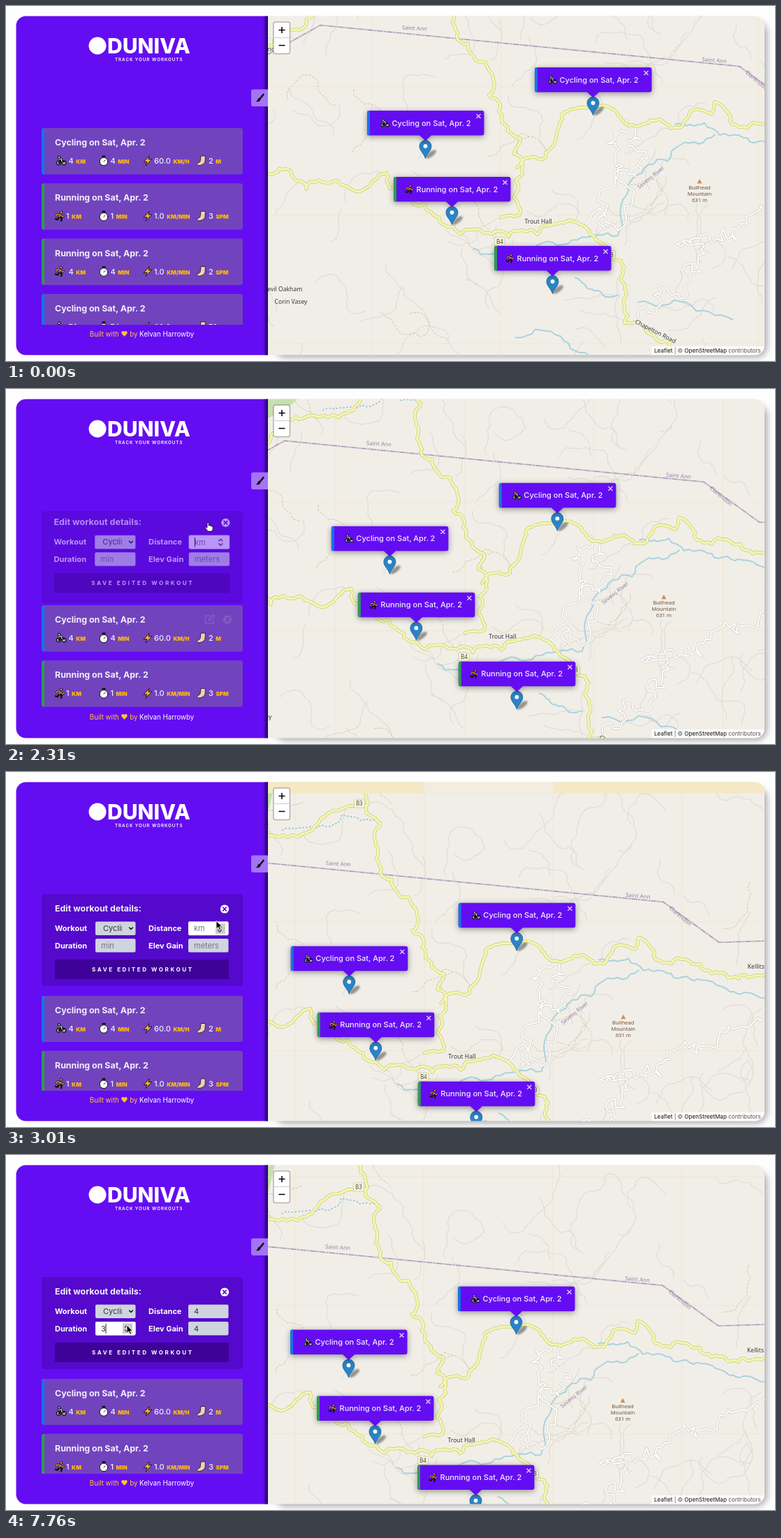
An HTML page that plays this animation: 1101 by 509 pixels, repeating every 8 s.

```html
<!DOCTYPE html>
<html lang="en">
<head>
<meta charset="utf-8">
<title>Workout tracker</title>
<style>
html, body { margin: 0; width: 100%; height: 100%; overflow: hidden; background: #fefefe; }
svg { font-family: Inter, "Open Sans", sans-serif; }
#stage { display: block; }
.line { fill: none; stroke-linejoin: round; stroke-linecap: round; }
.place, .area, .peak, .sign { font: 8px "Noto Sans", sans-serif; text-anchor: middle; }
.place { font-size: 8.6px; fill: #333; stroke: #f5f3ee; stroke-width: 1.5px; paint-order: stroke; }
.area { fill: #9482a3; }
.peak { fill: #6f5138; font-size: 7.6px; }
.sign { fill: #444; }
.title { font-size: 12.4px; font-weight: 700; fill: #f2eff9; }
.value { font-size: 11px; font-weight: 500; fill: #f2eff9; }
.unit { font-size: 8px; font-weight: 900; fill: #ffb90f; }
.label { font-size: 11px; font-weight: 700; fill: #fff; }
.entry { font-size: 11px; fill: #333; }
.hint { font-size: 11px; fill: #757780; }
.popup { filter: drop-shadow(0 2px 4px rgba(0,0,0,.4)); }
</style>
</head>
<body>
<svg id="stage" width="1101" height="509" viewBox="0 0 1101 509">
  <defs>
    <clipPath id="mapClip"><path d="M375 14.5H1072a14 14 0 0 1 14 14V486.500a14 14 0 0 1-14 14H375z"/></clipPath>
    <clipPath id="listClip"><rect x="50" y="175" width="290" height="282"/></clipPath>
    <filter id="soft" x="-20%" y="-20%" width="140%" height="140%"><feGaussianBlur stdDeviation="5"/></filter>
    <filter id="blur" x="-50%" y="-50%" width="200%" height="200%"><feGaussianBlur stdDeviation="1.3"/></filter>
    <linearGradient id="edge"><stop offset="0" stop-color="#10003a" stop-opacity="0"/><stop offset="1" stop-color="#10003a" stop-opacity=".85"/></linearGradient>
    <g id="bike" class="line" stroke="#111" stroke-width="1.2">
      <circle cx="-3.8" cy="3" r="2.9" fill="#aaa"/><circle cx="4" cy="3" r="2.9" fill="#aaa"/>
      <path d="M-3 3 0-1 4 1M-4-2 0-3 1 2" stroke-width="2.6"/><path d="M-4-2 0-3 1 1" stroke="#ddd"/>
      <circle cx="-3" cy="-5" r="1.7" fill="#eee"/>
    </g>
    <g id="run" class="line">
      <path d="M1-2-1 1 3 3 2 6.500M-1 1-3 5-6 4M1-2-4-3-5 0M1-2 4 1 6-1" stroke="#111" stroke-width="2.4"/>
      <path d="M1-2-4-3-5 0M1-2 4 1 6-1M1-2-1 1" stroke="#f39a35" stroke-width="1.2"/>
      <circle cx="2" cy="-5.5" r="1.8" fill="#f2a03c" stroke="#111" stroke-width=".9"/>
    </g>
    <g id="watch" class="line" stroke="#111">
      <path d="M-1.500-6.500H1.500" stroke-width="2.4"/><circle cy="1" r="5.8" style="fill:#fff"/><path d="M0 1 2-1"/>
    </g>
    <path id="bolt" d="M2-7-6 2-1 1.500-3 7 6-2.500 1-2z" fill="#ffb02c" stroke="#1b1230" stroke-linejoin="round"/>
    <path id="foot" d="M-1-7H5.500L5 1Q4 5-2 6.500-7 7-6.500 4.500L-2 1z" fill="#efcfb6" stroke="#2a1a22" stroke-width=".9"/>
    <g id="pin">
      <ellipse cx="8" cy="-6" rx="9" ry="3.6" transform="rotate(-38 8 -6)" opacity=".38" filter="url(#blur)"/>
      <path d="M0 0C-2-7-8.500-11-8.500-17.500A8.500 8.500 0 0 1 8.500-17.500C8.500-11 2-7 0 0z" fill="#2b83c6" stroke="#226ba6"/>
      <circle cy="-17.5" r="2.9" fill="#fff"/>
    </g>
    <g id="badge"><circle r="6.6"/><path d="M-2.300-2.300 2.300 2.300M2.300-2.300-2.300 2.300" stroke-width="1.7" stroke-linecap="round"/></g>
  </defs>

  <rect x="384" y="22" width="706" height="482" rx="16" fill="#777" opacity=".6" filter="url(#soft)"/>
  <g clip-path="url(#mapClip)">
    <rect x="375" y="14" width="711" height="487" fill="#f1eee8"/>
    <g id="map"></g>
  </g>
  <rect x="383" y="23" width="23.5" height="45.5" rx="3" fill="#fff" stroke="#000" stroke-opacity=".28" stroke-width="1.5"/>
  <path d="M384 45.500H406" stroke="#ccc"/>
  <path d="M390.500 34.500H399.500M395 30V39M390.500 56.500H399.500" stroke="#000" stroke-width="1.5"/>
  <path d="M924 488H1086A14 14 0 0 1 1072 500.500H924z" fill="#fff" fill-opacity=".75"/>
  <text x="928" y="497" font-size="8.15" fill="#555"><tspan fill="#111">Leaflet</tspan> | © <tspan fill="#111">OpenStreetMap</tspan> contributors</text>

  <path d="M375 14.500H28.500a14 14 0 0 0-14 14V486.500a14 14 0 0 0 14 14H375z" fill="#640df2"/>
  <rect x="368" y="14.5" width="7" height="486" fill="url(#edge)"/>
  <path d="M375 119.500H354a3 3 0 0 0-3 3V141a3 3 0 0 0 3 3H375z" fill="#a473f7"/>
  <path d="M368.500 127 363.500 133" class="line" stroke="#111" stroke-width="2.6"/>
  <path d="M361.500 131.500 364.500 134.500Q363 138 358 137 360.500 135 361.500 131.500z" fill="#111"/>
  <circle cx="131" cy="57" r="12.5" fill="#fff"/>
  <text x="145" y="68" font-size="30" font-weight="800" fill="#fff">DUNIVA</text>
  <text x="156" y="79" font-size="6.2" font-weight="600" letter-spacing="1" fill="#fff">TRACK YOUR WORKOUTS</text>
  <text x="194.5" y="473.5" font-size="9.7" text-anchor="middle" fill="#fff"><tspan fill="#ffc62b">Built with ♥ by</tspan> Kelvan Harrowby</text>

  <g clip-path="url(#listClip)">
    <g id="form"></g>
    <g id="cards"></g>
  </g>
  <g id="cursor">
    <path id="arrow" d="M0 0V11.500L2.700 9 4.700 13.300 6.700 12.400 4.800 8.300 8.300 8.200z" fill="#000" stroke="#fff" stroke-width=".9"/>
    <path id="hand" d="M-1 1Q0-1 1.200 1V5Q3 4 3.700 5.300 5.300 4.700 5.800 6.200 7.400 6 7.300 8 7.300 10.500 5.800 13H-.3Q-1.500 10.500-3.500 8.500-4.300 6.800-2.800 6.900L-1 8z" fill="#fff" stroke="#111" stroke-width=".9"/>
  </g>
</svg>

<script>
const LOOP = 8000, BLINK = 530;
const $ = id => document.getElementById(id);
const add = (parent, markup) => {
  parent.insertAdjacentHTML('beforeend', markup);
  return parent.lastElementChild;
};

// Steps are [time, properties, easing]; the ends are held.
function play(el, steps) {
  const all = [[0, steps[0][1]], ...steps, [LOOP, steps[steps.length - 1][1]]];
  el.animate(all.map(([t, props, easing = 'linear']) => ({ ...props, offset: t / LOOP, easing })),
    { duration: LOOP, iterations: Infinity });
}
// Hidden at first, then on and off at the given times.
const toggle = (el, ...times) => play(el, [[0, { opacity: 0 }, 'step-end'],
  ...times.map((t, i) => [t, { opacity: i % 2 ? 0 : 1 }, 'step-end'])]);
const move = (x, y) => ({ transform: `translate(${x}px, ${y}px)` });

let seed = 41;
const rnd = () => (seed = seed * 16807 % 2147483647) / 2147483647;
const toPath = points => 'M' + points.map(p => p.map(v => v.toFixed(1)).join(' ')).join('L');

// A winding line: every part is bent at its middle until it is short.
function winding(keys, amp) {
  let list = keys.split(' ').map(p => p.split(',').map(Number));
  for (let pass = 0; pass < 4; pass++) {
    list = list.flatMap(([x, y], i) => {
      if (!i) return [[x, y]];
      const [px, py] = list[i - 1], k = (rnd() - .5) * amp;
      if (Math.hypot(x - px, y - py) < 8) return [[x, y]];
      return [[(x + px) / 2 - (y - py) * k, (y + py) / 2 + (x - px) * k], [x, y]];
    });
  }
  return toPath(list);
}
const stroke = (d, color, width, more = '') =>
  `<path class="line" d="${d}" stroke="${color}" stroke-width="${width}" ${more}/>`;
const lines = (keys, amp) => keys.map(k => winding(k, amp)).join('');
const road = (d, casing, fill, width) => `<g>${stroke(d, casing, width)}${stroke(d, fill, width * .64)}</g>`;

// Random wandering paths over the whole map.
function wander(count, turn) {
  return Array.from({ length: count }, () => {
    let x = 265 + rnd() * 820, y = 15 + rnd() * 585, a = rnd() * 6.3;
    return toPath(Array.from({ length: 7 + rnd() * 12 }, () => {
      a += (rnd() - .5) * turn;
      return [x += 9 * Math.cos(a), y += 9 * Math.sin(a)];
    }));
  }).join('');
}

const TILE = 184.6, TILE_X = 413.5, TILE_Y = 31;
const grid = () => [-1, 0, 1, 2, 3].map(k =>
  `M${TILE_X + TILE * k} 0V620M250 ${TILE_Y + TILE * k}H1100`).join('');

const text = (cls, x, y, words, more = '') => `<text class="${cls}" x="${x}" y="${y}" ${more}>${words}</text>`;
const label = (cls, x, y, words, turn = 0) =>
  text(cls, 0, 3, words, `transform="translate(${x} ${y}) rotate(${turn})"`);
const sign = (x, y, name) => `<rect x="${x - 7.5}" y="${y - 6}" width="15" height="12" rx="2"
  fill="#fbfbdc" stroke="#c5c49a" stroke-width=".8"/>${label('sign', x, y, name)}`;
const use = (id, x, y, scale = 1) => `<use href="#${id}" transform="translate(${x} ${y}) scale(${scale})"/>`;

const colors = { Cycling: '#1673e8', Running: '#2f9a55' };
const icons = { Cycling: 'bike', Running: 'run' };

function marker(x, y, kind) {
  const left = kind === 'Cycling' ? -48 : -51;
  return `<g transform="translate(${x} ${y})"><use href="#pin"/><g class="popup">
    <rect x="-83.5" y="-68.5" width="167.5" height="35.5" rx="3" fill="#640df2"/><path d="M-9-33.500H9L0-25z" fill="#640df2"/>
    <path d="M-79.500-68.500V-33H-80.500a3 3 0 0 1-3-3V-65.500a3 3 0 0 1 3-3z" fill="${colors[kind]}"/></g>
    ${use(icons[kind], left - 10, -50.500, .85)}
    <text x="${left}" y="-47" font-size="11" font-weight="500" fill="#f1ecff">${kind} on Sat, Apr. 2</text>
    <path d="M73-63.500 79-57.500M79-63.500 73-57.500" stroke="#d9c9fa" stroke-width="1.5"/></g>`;
}

// The map, drawn where it rests after the pan.
const map = $('map');
add(map, '<path d="M270 0H388L376 52 340 85 270 116z" fill="#c6dfae"/>');
add(map, stroke(wander(85, 1.7), '#dfdcd7', 1.2));
add(map, stroke(grid(), '#f4e2c1', .9, 'opacity=".75"'));
add(map, stroke(wander(12, 2), '#d9c79c', 1, 'stroke-dasharray="3 2.5"'));
add(map, stroke(lines(['848,270 890,268 940,286 985,300 1045,318 1086,325', '905,285 855,300 778,372 766,430 650,444 560,448',
  '705,490 765,515', '795,525 930,550', '620,576 725,602'], .4), '#aad3df', 2));
add(map, stroke(winding('395,84 440,82 480,62 535,72', .4), '#8fc6dc', 1.8, 'stroke-dasharray="1 4"'));
add(map, road(lines(['778,264 768,305 766,340 780,360 720,414', '795,272 808,320 762,352 748,420',
  '1086,348 1020,380 950,402 900,440 850,442 890,456 856,520 795,546'], 1), '#c8c4bf', '#fff', 3.2));
const boundary = 'M265 170 340 128 940 187 1020 245 1086 243';
add(map, stroke(boundary, '#cdbcd0', 2.2, 'opacity=".7"'));
add(map, stroke(boundary, '#a58fab', 1.1, 'stroke-dasharray="7 3 1 3"'));
add(map, road(lines([
  '498,5 519,62 535,74 528,105 535,145 586,197 581,228 626,290 617,312 630,328 617,375 625,400 598,404',
  '513,48 455,65 430,88 375,92 318,130 265,160',
  '265,340 320,363 400,365 435,340 440,362 490,386 515,413 570,422 650,428 720,418 752,448 778,510 775,555 850,605',
  '622,332 680,278 705,248 770,260 782,272 842,276 900,255 905,238 930,270 1010,290 1086,290'], .5),
  '#cdd182', '#f5f7b0', 4.8));
add(map, `<g>${label('area', 475, 132, 'Saint Ann', 3)}${label('area', 904, 178, 'Saint Ann', 5)}
  ${label('area', 965, 207, 'Clarendon', 40)}${label('area', 813, 346, 'Sevens River', -39)}
  ${label('place', 652, 409, 'Trout Hall')}${label('place', 1073, 280, 'Kellits')}
  ${label('place', 286, 506, 'Nevil Oakham')}${label('place', 298, 524, 'Corin Vasey')}
  ${label('place', 269, 162, 'ric')}${label('place', 820, 567, 'Chapelton Road', 27)}
  <path d="M883 348.500 886.500 355H879.500z" fill="#d08f55"/>
  ${['Bullhead', 'Mountain', '631 m'].map((s, i) => label('peak', 883, 360 + 9 * i, s)).join('')}
  ${sign(505, 46, 'B3')}${sign(597, 438, 'B4')}${sign(755, 457, 'B3')}</g>`);
const unloaded = add(map, `<g><path d="M228-153H1152V${TILE_Y}H228z" fill="#f4e8c5"/>
  <rect x="${TILE_X + TILE}" y="${TILE_Y - TILE}" width="${TILE}" height="${TILE}" fill="#f3ece0"/></g>`);
toggle(unloaded, 0, 3100);
add(map, `<g>${marker(730.5, 257, 'Cycling')}${marker(490.5, 319, 'Cycling')}
  ${marker(528.5, 414, 'Running')}${marker(672.5, 513, 'Running')}</g>`);
const easeOutCubic = 'cubic-bezier(.333, 1, .667, 1)';
play(map, [[2098, move(110, -100.5), easeOutCubic], [3231, move(0, 0)]]);

// Workout list
const cards = $('cards');
const stat = (x, value, unit) =>
  `<text class="value" x="${x}" y="51">${value}<tspan class="unit" dx="3.5">${unit}</tspan></text>`;
function card(i, kind, km, min, pace, last) {
  const bike = kind === 'Cycling';
  return add(cards, `<g transform="translate(0 ${175 + 79.3 * i})">
    <rect x="51" width="288" height="66.5" rx="3.5" fill="#7144be"/>
    <path d="M55 0V66.500a4 4 0 0 1-4-4V4a4 4 0 0 1 4-4z" fill="${colors[kind]}"/>
    <text class="title" x="70" y="25">${kind} on Sat, Apr. 2</text>
    ${use(icons[kind], bike ? 79 : 77, 47)}${use('watch', 140, 47)}${use('bolt', 203, 47)}${use('foot', 280, 47)}
    ${stat(bike || km > 1 ? 89.5 : 86, km, 'KM')}${stat(149.5, min, 'MIN')}
    ${stat(212, pace, bike ? 'KM/H' : 'KM/MIN')}${stat(290, last, bike ? 'M' : 'SPM')}</g>`);
}
const first = card(0, 'Cycling', 4, 4, '60.0', 2);
card(1, 'Running', 1, 1, '1.0', 3);
card(2, 'Running', 4, 4, '1.0', 2);
card(3, 'Cycling', 70, 74, '60.0', 70);
play(cards, [[1806, move(0, 0), 'ease'], [2556, move(0, 145.5)]]);

const tools = add(first, `<g><path class="line" d="M292 15H285.500V26H297V21M290 22 290.500 19.500 296.500 13.500 298.500 15.500 292.500 21.500z" stroke="#cfc0ea" stroke-width="1.6"/>
  <g transform="translate(317 20.5)" fill="#cfc0ea" stroke="#7144be"><use href="#badge"/></g></g>`);
play(tools, [[1270, { opacity: 0 }], [1520, { opacity: 1 }], [2150, { opacity: 1 }], [2350, { opacity: 0 }]]);

// Edit form
const form = $('form');
add(form, '<rect x="51" y="175" width="288" height="132" rx="4" fill="#5409cc"/>');
const body = add(form, `<g style="transform-origin:195px 175px">
  <text class="title" x="70" y="200">Edit workout details:</text>
  <g transform="translate(313 196.5)" fill="#fff" stroke="#5409cc"><use href="#badge"/></g>
  ${text('label', 70, 228, 'Workout')}${text('label', 204, 228, 'Distance')}
  ${text('label', 70, 252.5, 'Duration')}${text('label', 204, 252.5, 'Elev Gain')}
  <rect x="128" y="214.5" width="57.5" height="19.5" rx="2" fill="#ced5df"/>
  <svg x="138" y="214" width="28" height="20"><text class="entry" x="1" y="14.2">Cycling</text></svg>
  <path class="line" d="M176.500 223 179 225.500 181.500 223" stroke="#111" stroke-width="1.5"/>
  <rect x="70" y="269" width="249" height="28" rx="2" fill="#3e0299"/>
  <text x="195.8" y="286" font-size="8" font-weight="700" letter-spacing="2.6" text-anchor="middle" fill="#fff">SAVE EDITED WORKOUT</text></g>`);

// Times at which a caret turns on and off from start to end.
function blinking(start, end) {
  const times = [];
  for (let t = start; t < end; t += BLINK) times.push(t);
  return [...times, end];
}

// A number field, counted up by clicks on its spinner.
function field({ x, y, hint, focus, blur, arrive, leave, click, gap, count }) {
  const box = add(body, `<g transform="translate(${x} ${y})"><rect width="57.5" height="19.5" rx="2" fill="#ced5df"/></g>`);
  const last = click + gap * (count - 1);
  const caret = at => add(box, `<rect x="${at}" y="3" width="1" height="14" fill="#222"/>`);
  toggle(add(box, '<rect width="57.5" height="19.5" rx="2" fill="#fff"/>'), focus, blur);
  toggle(add(box, text('hint', 8, 13.8, hint)), 0, click);
  for (let i = 0; i < count; i++) {
    const t = click + gap * i;
    toggle(add(box, text('entry', 8, 13.8, i + 1)), t, t < last ? t + gap : LOOP);
  }
  toggle(add(box, '<rect x="39" y="2.5" width="14" height="14.5" fill="#cbcbcb"/>'), arrive, leave);
  toggle(add(box, '<path class="line" d="M42.500 8 45 5.500 47.500 8M42.500 12 45 14.500 47.500 12" stroke="#444" stroke-width="1.5"/>'),
    Math.min(arrive, focus), blur);
  if (focus < click) toggle(caret(8), ...blinking(focus, click));
  toggle(caret(14.5), click, last, ...blinking(last, blur));
}
field({ x: 261, y: 214.5, hint: 'km', focus: 2100, blur: 5740, arrive: 3000, leave: 4600, click: 3630, gap: 243, count: 4 });
field({ x: 261, y: 239, hint: 'meters', focus: 5740, blur: 7360, arrive: 4630, leave: 6330, click: 5740, gap: 137, count: 4 });
field({ x: 128, y: 239, hint: 'min', focus: 7360, blur: LOOP, arrive: 6370, leave: LOOP, click: 7360, gap: 190, count: 3 });

play(form, [[2040, { opacity: 0 }], [2160, { opacity: .1 }], [2450, { opacity: 1 }]]);
const grown = (dy, scale) => ({ transform: `translate(0px, ${dy}px) scale(${scale}, 1)` });
play(body, [[1830, grown(-20, 1.05)], [2160, grown(-10, 1.025), 'ease-out'], [2580, grown(0, 1)]]);

// Pointer: to the edit button, then to each spinner in turn.
play($('cursor'), [[410, move(1086, 498), 'ease-out'], [1190, move(316, 211)],
  [1520, move(289, 191)], [2690, move(289, 191), 'ease-out'], [3160, move(303, 217)],
  [3870, move(304, 217)], [4250, move(306, 220)], [4540, move(306, 220)],
  [4640, move(303, 238)], [5180, move(303, 238)], [5580, move(306, 242)],
  [6260, move(306, 242)], [6370, move(165, 242)], [6900, move(173, 244)]]);
toggle($('arrow'), 410, 1430, 2690, LOOP);
toggle($('hand'), 1430, 2690);
</script>
</body>
</html>
```
